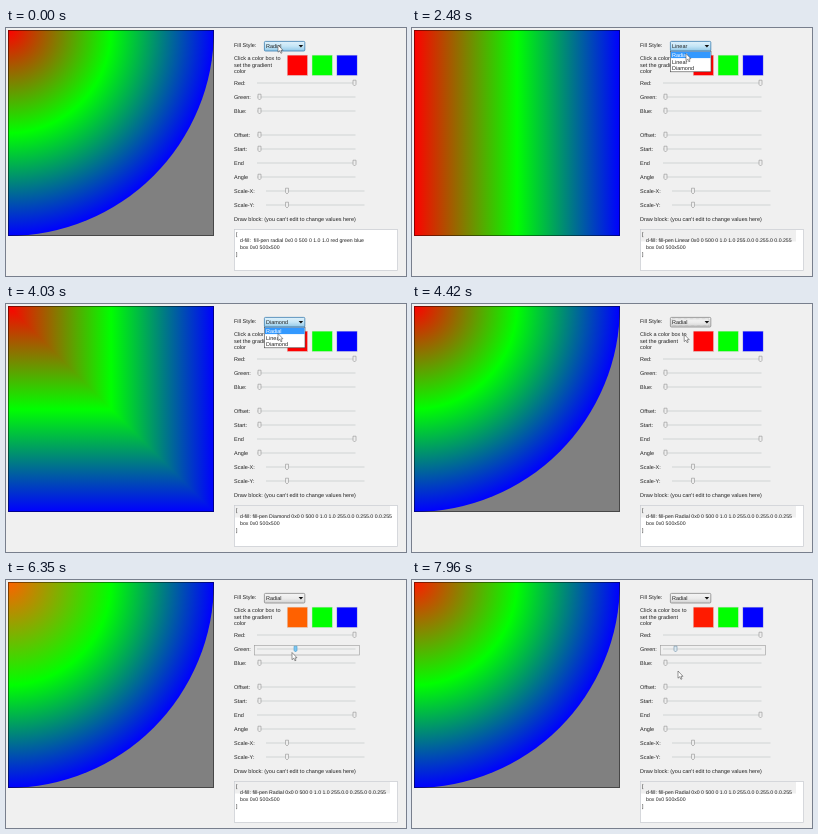
An HTML page for the animation above (8000 ms loop, 400 px wide and 248 px high).

```html
<!DOCTYPE html>
<html lang="en">
<head>
<meta charset="utf-8">
<title>Gradient lab</title>
<style>
  html, body { margin: 0; width: 100%; height: 100%; overflow: hidden; background: #f0f0f0; }
  svg { display: block; width: 400px; height: 248px; --c: #f00; }
  text { font: 5.5px "Liberation Sans", Arial, sans-serif; fill: #222; white-space: pre; text-rendering: geometricPrecision; }
  .code text { font-size: 5.2px; }
  .first { stop-color: var(--c); }
  .combo { fill: url(#btn); stroke: #8a8a8a; stroke-width: .8; }
  .hot .combo { fill: url(#btnHot); stroke: #3c7fb1; }
  .track { fill: #c9cccc; }
  .knob { fill: #eee; stroke: #939393; stroke-width: .6; }
  .knob.drag { fill: #7cc6f2; stroke: #4a9cc9; }
  .knob.focus { fill: #dbe8f0; stroke: #6f8fa5; }
  .ring { fill: none; stroke: #999; stroke-width: .6; }
  .on { fill: #fff; }
</style>
</head>
<body>
<svg id="stage" viewBox="0 0 400 248">
  <defs>
    <radialGradient id="radial" gradientUnits="userSpaceOnUse" cx="2" cy="2" r="206">
      <stop class="first"/><stop offset=".5" stop-color="#0f0"/><stop offset="1" stop-color="#00f"/>
    </radialGradient>
    <linearGradient id="across" gradientUnits="userSpaceOnUse" x1="2" y1="0" x2="208" y2="0">
      <stop class="first"/><stop offset=".5" stop-color="#0f0"/><stop offset="1" stop-color="#00f"/>
    </linearGradient>
    <linearGradient id="down" href="#across" x1="0" y1="2" x2="0" y2="208"/>
    <linearGradient id="btn" x2="0" y2="1">
      <stop stop-color="#f4f4f4"/><stop offset=".5" stop-color="#ececec"/><stop offset="1" stop-color="#d2d2d2"/>
    </linearGradient>
    <linearGradient id="btnHot" x2="0" y2="1">
      <stop stop-color="#e0f1fb"/><stop offset=".5" stop-color="#c4e5f6"/><stop offset="1" stop-color="#90c8e8"/>
    </linearGradient>
  </defs>

  <rect width="400" height="248" fill="#f0f0f0"/>
  <rect x="2" y="2" width="206" height="206" fill="#808080"/>
  <g id="art">
    <path d="M2 2H208A206 206 0 0 1 2 208Z" fill="url(#radial)"/>
    <rect x="2" y="2" width="206" height="206" fill="url(#across)"/>
    <g>
      <rect x="2" y="2" width="206" height="206" fill="url(#down)"/>
      <path d="M2 2H208V208Z" fill="url(#across)"/>
    </g>
  </g>
  <rect x="2.5" y="2.5" width="205" height="205" fill="none" stroke="#000" stroke-opacity=".45"/>

  <text x="228" y="18.5">Fill Style:</text>
  <text x="228" y="32">Click a color box to</text>
  <text x="228" y="38.5">set the gradient</text>
  <text x="228" y="45">color</text>
  <g id="swatches" stroke="#ddd" stroke-width=".5"></g>

  <rect id="focus" class="ring" x="248.5" y="65.5" width="105" height="9.5"/>
  <g id="sliders"></g>
  <text x="228" y="193">Draw block: (you can't edit to change values here)</text>

  <g class="code">
    <rect x="228.5" y="201.5" width="163" height="41" fill="#fff" stroke="#c8cbd0" stroke-width=".7"/>
    <rect id="shade" x="229" y="202" width="155" height="11.5" fill="#efefef"/>
    <text x="230" y="207.7">[</text>
    <text id="pen" x="234" y="214"></text>
    <text x="234" y="220.5">box 0x0 500x500</text>
    <text x="230" y="227.5">]</text>
  </g>

  <g id="box">
    <rect class="combo" x="258.4" y="13.4" width="40.4" height="9.6" rx="1"/>
    <rect id="ring" class="ring" x="260" y="14.8" width="37" height="6.8" stroke-dasharray=".6"/>
    <text id="choice" x="260" y="20.2"></text>
    <path d="M292.6 16.9h4.6l-2.3 2.7z" fill="#111"/>
  </g>
  <g id="list">
    <rect x="258.4" y="23.2" width="40.6" height="20.6" fill="#fff" stroke="#444" stroke-width=".6"/>
    <rect id="mark" x="258.8" width="39.8" height="6.5" fill="#39f"/>
  </g>
  <path id="cursor" d="M0 0V7.2L1.7 5.7L2.9 8.3L4 7.8L2.9 5.3H5Z" fill="#fff" stroke="#333" stroke-width=".5"/>
</svg>
<script>
const LOOP = 8000, TICK = 136.4;
const NS = "http://www.w3.org/2000/svg";
const $ = id => document.getElementById(id);

function add(parent, tag, attrs, text) {
  const el = document.createElementNS(NS, tag);
  for (const k in attrs) el.setAttribute(k, attrs[k]);
  if (text) el.textContent = text;
  return parent.appendChild(el);
}

["var(--c)", "#0f0", "#00f"].forEach((color, i) =>
  add($("swatches"), "rect", { x: 281.2 + i * 24.8, y: 27.1, width: 20.4, height: 20.4, style: `fill:${color}` }));

const labels = ["Red:", "Green:", "Blue:", "Offset:", "Start:", "End", "Angle", "Scale-X:", "Scale-Y:"];
const LOW = 253.5, SPAN = 95;
const knobs = labels.map((label, i) => {
  const g = $("sliders"), scale = label.startsWith("Scale");
  const y = 55 + i * 14 + (i > 2 ? 10 : 0);
  const at = scale ? 281 : LOW + (/Red|End/.test(label) ? SPAN : 0);
  add(g, "text", { x: 228, y: y + 2 }, label);
  add(g, "rect", { class: "track", x: scale ? 260 : 251, y: y - .4, width: 98.5, height: .8 });
  return add(g, "path", { class: "knob", d: "M-1.5-2.8H1.5V1.4L0 3L-1.5 1.4Z", transform: `translate(${at} ${y})` });
});
const green = knobs[1];

const ROW = 6.5, TOP = 23.6;
const styles = ["Radial", "Linear", "Diamond"];
const rows = styles.map((s, i) => add($("list"), "text", { x: 260, y: 29 + i * ROW }, s));

const rounds = [
  { open: 390, done: 1820, pick: 1 },
  { open: 2330, done: 2900, pick: 2 },
  { open: 3985, done: 4300, pick: 0 }
];
// time, x, y
const pointer = [
  [0, 272, 17], [1200, 272, 18], [1530, 271, 34], [1820, 271, 34], [2250, 274, 18],
  [2500, 274, 25.5], [2770, 273, 38], [2900, 273, 38], [3700, 272, 18], [4000, 272, 29.5],
  [4300, 272, 29.5], [5366, 279, 58.5], [5775, 252, 70], [6867, 320, 75], [7650, 260, 75], [7958, 266, 91]
];
// time, x
const drag = [[5775, LOW], [6867, 325.5], [7650, 263.5]];

function glide(track, t) {
  const i = track.findIndex(k => k[0] > t);
  if (i < 1) return track.at(i).slice(1);
  const a = track[i - 1], b = track[i], f = (t - a[0]) / (b[0] - a[0]);
  const s = f * f * (3 - 2 * f);
  return a.slice(1).map((v, j) => v + (b[j + 1] - v) * s);
}

const show = (el, on) => { el.style.display = on ? "" : "none"; };
const move = (el, x, y) => el.setAttribute("transform", `translate(${x} ${y})`);

function draw(t) {
  // the screen refreshes in even ticks
  const q = Math.max(0, 1820 + Math.floor((t - 1797) / TICK) * TICK);
  const [x, y] = glide(pointer, q), [knob] = glide(drag, q);
  const last = rounds.filter(r => r.done <= t).pop();
  const pick = last ? last.pick : 0;
  const open = rounds.some(r => r.open <= t && t < r.done);
  const row = y < TOP ? pick : Math.min(2, Math.floor((y - TOP) / ROW));
  const hot = open || y < TOP;
  const focused = t >= 5755;

  [...$("art").children].forEach((el, i) => show(el, i === pick));
  $("choice").textContent = styles[pick];
  $("pen").textContent = last
    ? `d-fill: fill-pen ${styles[pick]} 0x0 0 500 0 1.0 1.0 255.0.0 0.255.0 0.0.255`
    : "d-fill:  fill-pen radial 0x0 0 500 0 1.0 1.0 red green blue";
  show($("shade"), last);

  show($("list"), open);
  $("mark").setAttribute("y", TOP + row * ROW);
  rows.forEach((r, i) => r.setAttribute("class", i === row ? "on" : ""));
  $("box").setAttribute("class", hot ? "hot" : "");
  show($("ring"), !hot && !focused);

  show($("focus"), focused);
  green.setAttribute("class", "knob" + (focused ? t < 7720 ? " drag" : " focus" : ""));
  move(green, knob, 69);
  move($("cursor"), x, y);
  const level = Math.round((knob - LOW) / SPAN * 255);
  $("stage").style.setProperty("--c", `rgb(255,${level},0)`);
}

const start = performance.now();
function tick() {
  draw((performance.now() - start) % LOOP);
  requestAnimationFrame(tick);
}
draw(0);
requestAnimationFrame(tick);
</script>
</body>
</html>
```
